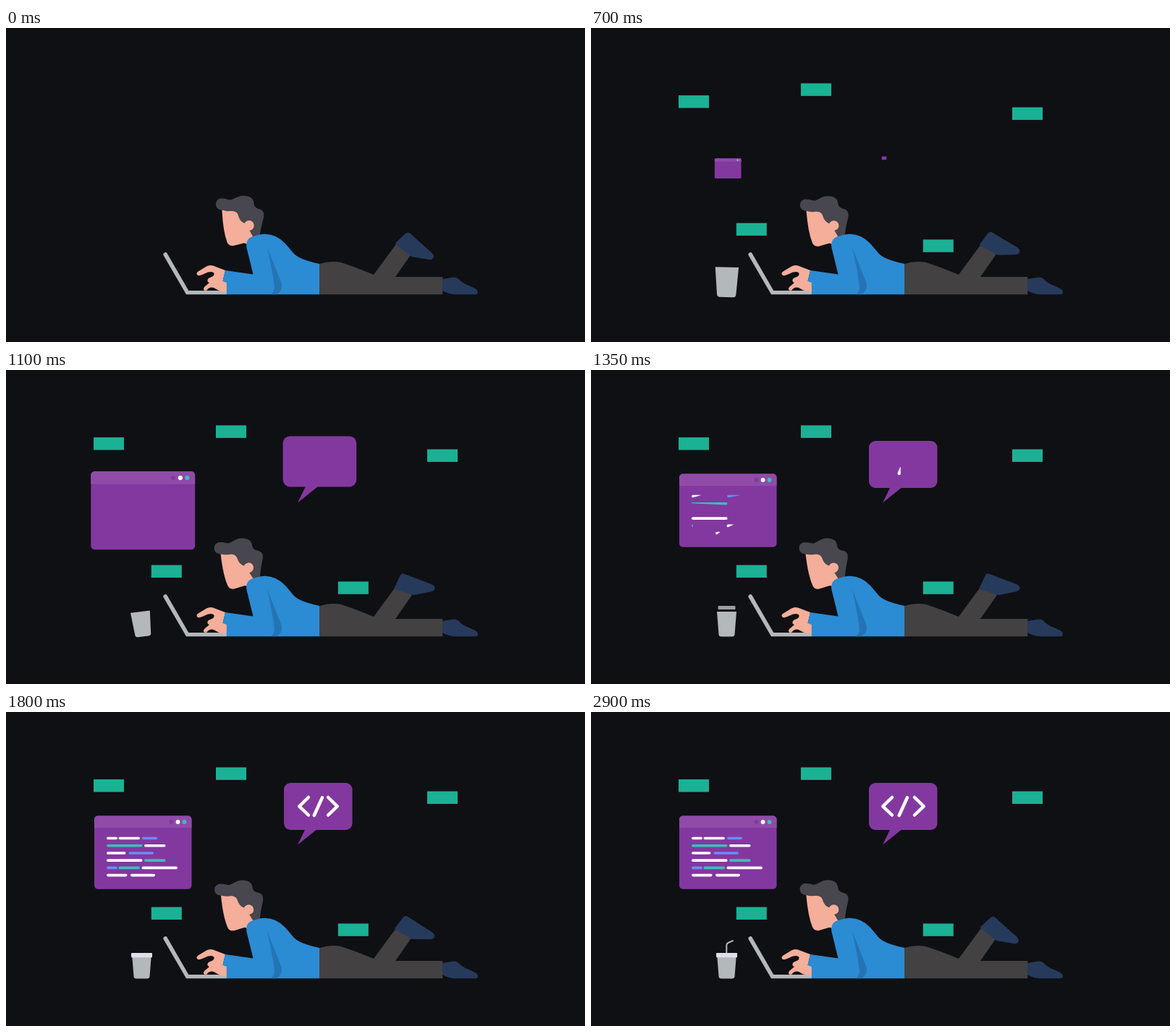
An HTML page that plays this animation: 800x434 px, repeating every 2950 ms.

```html
<!DOCTYPE html>
<html lang="en">
<head>
<meta charset="utf-8">
<title>Coding on the floor</title>
<style>
  html, body { margin: 0; width: 100%; height: 100%; overflow: hidden; background: #0f1014; }
  svg { display: block; width: 100%; height: 100%; }
</style>
</head>
<body>
<svg viewBox="0 0 800 434">
  <g id="notes" fill="#1bb194"></g>

  <g id="win">
    <rect x="122" y="143.5" width="134.5" height="101.3" rx="5" fill="#83389f"/>
    <path d="M122 160V148.500a5 5 0 0 1 5-5H251.500a5 5 0 0 1 5 5V160Z" fill="#904ba9"/>
    <circle cx="228.300" cy="152" r="2.900" fill="#83389f"/>
    <circle cx="237.500" cy="152" r="2.900" fill="#fff"/>
    <circle cx="246.500" cy="152" r="2.900" fill="#3fbdb8"/>
  </g>
  <g id="code"></g>

  <g id="bubble" fill="#83389f">
    <rect x="384" y="98" width="94.5" height="65" rx="9"/>
    <path d="M414 161L403 183.500L431 161Z"/>
  </g>
  <path id="slash" fill="#fff"/>
  <g fill="none" stroke="#fff" stroke-width="4.5" stroke-linecap="round" stroke-linejoin="round">
    <path id="open" d="M416 118L403.300 130.300L416 142.500"/>
    <path id="close" d="M447 118L459.700 130.300L447 142.500"/>
  </g>

  <path id="straw" d="M187.300 334V322.500Q187.300 320 189.500 319L196 316.200" pathLength="1"
        fill="none" stroke="#b3b8bb" stroke-width="2" stroke-linecap="round" stroke-dasharray="1 2"/>
  <path id="cup" d="M174 334H201L198.500 365.500Q198.200 368.500 195 368.500H180Q176.800 368.500 176.500 365.500Z" fill="#b3b8bb"/>
  <rect id="lid" x="173" y="333" width="29" height="6.200" rx="1" fill="#dde0ea"/>

  <path d="M217.800 314.500A2.800 2.800 0 0 1 222.600 311.600L252.300 363H305V368.300H249Z" fill="#b3b8bb"/>
  <path d="M303 335L286 328.500Q281 327 277 329.500L265.500 336.500Q262 339 264.500 341.500Q266.500 343 271 341L279 337.500Q286 336 287.500 339Q288 343 283 344.500Q277.500 346 278.500 350Q279 351.500 281 352L274 358Q271.500 362 275 363Q278 363 279 360.500Q283 357 288 359.500Q295 364.500 305 364.500V348L299.500 350Z" fill="#f4ae9a"/>

  <g id="head">
    <path d="M298.300 248Q299.500 280 305.500 296Q307.500 301.500 314 301L329 297.300L334 299L343 290L338 270L320 248Z" fill="#f4ae9a"/>
    <path d="M297 235.500C304 235 307 238 311 237.500C318 235 322 231.500 329 231.800C338 232.500 342 236 342.500 242C343 248 346 249 351 250.500C356 252.500 357 256 356 262C354 270 352 276 350.500 289L342 290L336 279L330 270C324 268 322 263 320.500 258C319 254 315 252.500 310 253C304 253.500 302 252.500 298 251.500C293 251 290 248 290 243.500C290 239 293 236 297 235.500Z" fill="#48464e"/>
    <circle cx="335.800" cy="273" r="6.900" fill="#f4ae9a"/>
  </g>

  <path d="M303 335L341.500 340.500L332.500 304Q330.500 292 340 288.500Q350 285 358 284.700Q374 285 386 298L397 311Q404 320 433.500 326V368.300H304.800V352L299.500 350Z" fill="#2b8bd3"/>
  <path d="M361 303L380.300 352Q383.500 363 373 368.300H366Q371 365 370.800 358Q370 345 361 303Z" fill="#2474b4"/>

  <path d="M433.500 326Q446 322 460 323.500Q469 325 508 341L541 296L561 311L538 344H603.300V368.300H433.500Z" fill="#434142"/>
  <path d="M603 347L617 344.700Q623 344 627 348.500C635 357 652 358 652 365Q652 368.300 648 368.300H621Q611 368 603 363Z" fill="#263a5c"/>
  <path id="foot" d="M538.800 296.500L551.500 284.500Q555.500 281 559 284.500L588 310.500Q593 315.500 589.500 319Q588 320.500 584 320L563 316.500Q558 315.800 555 312L538.800 299.300Q537.300 298 538.800 296.500Z" fill="#263a5c"/>
</svg>

<script>
const LOOP = 2950, STEP = 50;
const $ = id => document.getElementById(id);
const clamp = v => Math.max(0, Math.min(1, v));
const span = (t, a, b) => clamp((t - a) / (b - a));
const sine = p => (1 - Math.cos(Math.PI * p)) / 2;
const quad = p => p < .5 ? 2 * p * p : 1 - 2 * (1 - p) * (1 - p);
const out = p => 1 - (1 - p) * (1 - p);

// Value at time t along [time, value] stops, eased between neighbours.
function track(t, stops, ease = sine) {
  if (t <= stops[0][0]) return stops[0][1];
  for (let i = 1; i < stops.length; i++) {
    const [a, v] = stops[i - 1], [b, w] = stops[i];
    if (t <= b) return v + (w - v) * ease(span(t, a, b));
  }
  return stops[stops.length - 1][1];
}

function add(parent, tag, attrs) {
  const el = document.createElementNS('http://www.w3.org/2000/svg', tag);
  for (const k in attrs) el.setAttribute(k, attrs[k]);
  return parent.appendChild(el);
}

const set = (id, name, value) => $(id).setAttribute(name, value);
const show = (id, alpha) => set(id, 'opacity', alpha);
function place(id, x, y, scale = 1, turn = 0, dy = 0) {
  set(id, 'transform', `translate(${x} ${y + dy}) rotate(${turn}) scale(${scale}) translate(${-x} ${-y})`);
}

const notes = [[142, 101.8], [311, 85.2], [603, 118.3], [221.8, 278.3], [479.8, 301.1]].map(([x, y]) => ({
  x, y, el: add($('notes'), 'rect', { x: -21, y: -8.7, width: 42, height: 17.4 })
}));

// row, left, right, colour, start, grows from the right
const W = '#fff', B = '#6a8df5', T = '#3fbdb8';
const lines = [
  [0, 139, 154, W, 1220], [0, 155.5, 185, W, 1380], [0, 188, 209, B, 1220],
  [1, 139, 188.5, T, 1160, true], [1, 191, 220.5, W, 1400],
  [2, 139, 165.5, W, 1380], [2, 169.5, 204, B, 1430],
  [3, 139, 188.5, W, 1100], [3, 191, 220.5, T, 1390],
  [4, 139, 154, B, 1335], [4, 155.5, 185, T, 1400], [4, 187.5, 237, W, 1322],
  [5, 139, 167.5, W, 1380], [5, 172, 206, W, 1322]
].map(([row, x1, x2, fill, start, back]) => ({
  y: 174.5 + row * 10.22, x1, x2, start, back, el: add($('code'), 'path', { fill })
}));

// A bar that first stretches to a tapered tip, then fills out to a pill.
function bar(len, r, p) {
  if (p <= 0) return '';
  const grow = clamp(p / .6), fat = span(p, .6, 1);
  const tip = Math.max(.2, r * fat), end = Math.max(r, len * grow - tip);
  const top = -r, low = top + 2 * tip;
  return `M${r} ${top}L${end} ${top}A${tip} ${tip} 0 0 1 ${end} ${low}L${r} ${r}A${r} ${r} 0 0 1 ${r} ${top}Z`;
}

function draw(t) {
  const noteSize = quad(span(t, 100, 700));
  for (const n of notes) n.el.setAttribute('transform', `translate(${n.x} ${n.y}) scale(${noteSize})`);

  place('win', 189.2, 194.1, track(t, [[600, 0], [930, 1.3], [1180, 1]]));
  place('bubble', 403, 183.5, track(t, [[650, 0], [970, 1.19], [1200, 1]]));

  for (const l of lines) {
    l.el.setAttribute('d', bar(l.x2 - l.x1, 1.8, span(t, l.start, l.start + 250)));
    l.el.setAttribute('transform', l.back
      ? `translate(${l.x2} ${l.y}) rotate(180) scale(1 -1)`
      : `translate(${l.x1} ${l.y})`);
  }

  set('slash', 'd', bar(31.5, 2.25, span(t, 1300, 1530)));
  set('slash', 'transform', 'translate(424.8 145) rotate(-65.5)');
  const inset = 12 * (1 - out(span(t, 1500, 2000)));
  for (const [id, dx] of [['open', inset], ['close', -inset]]) {
    set(id, 'transform', `translate(${dx} 0)`);
    show(id, span(t, 1480, 1600));
  }

  place('cup', 187.5, 351,
    track(t, [[150, 0], [500, 1.28], [1050, 1]]),
    track(t, [[150, 0], [500, 23.6], [920, -25], [1200, 0]]));
  const drop = span(t, 1200, 1420);
  place('lid', 187.5, 336, .45 + .55 * drop, 0, -24 * (1 - drop));
  show('lid', drop);
  const sip = out(span(t, 1830, 2120));
  set('straw', 'stroke-dashoffset', 1 - sip);
  show('straw', sip > 0 ? 1 : 0);

  place('head', 340, 283, 1, track(t, [[200, 0], [1250, -3.7], [2250, -2.1], [2900, -2]]));
  place('foot', 549, 304, 1, track(t, [[180, 0], [1230, -22], [2260, 0]]));
}

const begin = performance.now();
function tick() {
  const t = (performance.now() - begin) % LOOP;
  draw(Math.floor(t / STEP) * STEP);
  requestAnimationFrame(tick);
}
draw(0);
requestAnimationFrame(tick);
</script>
</body>
</html>
```
